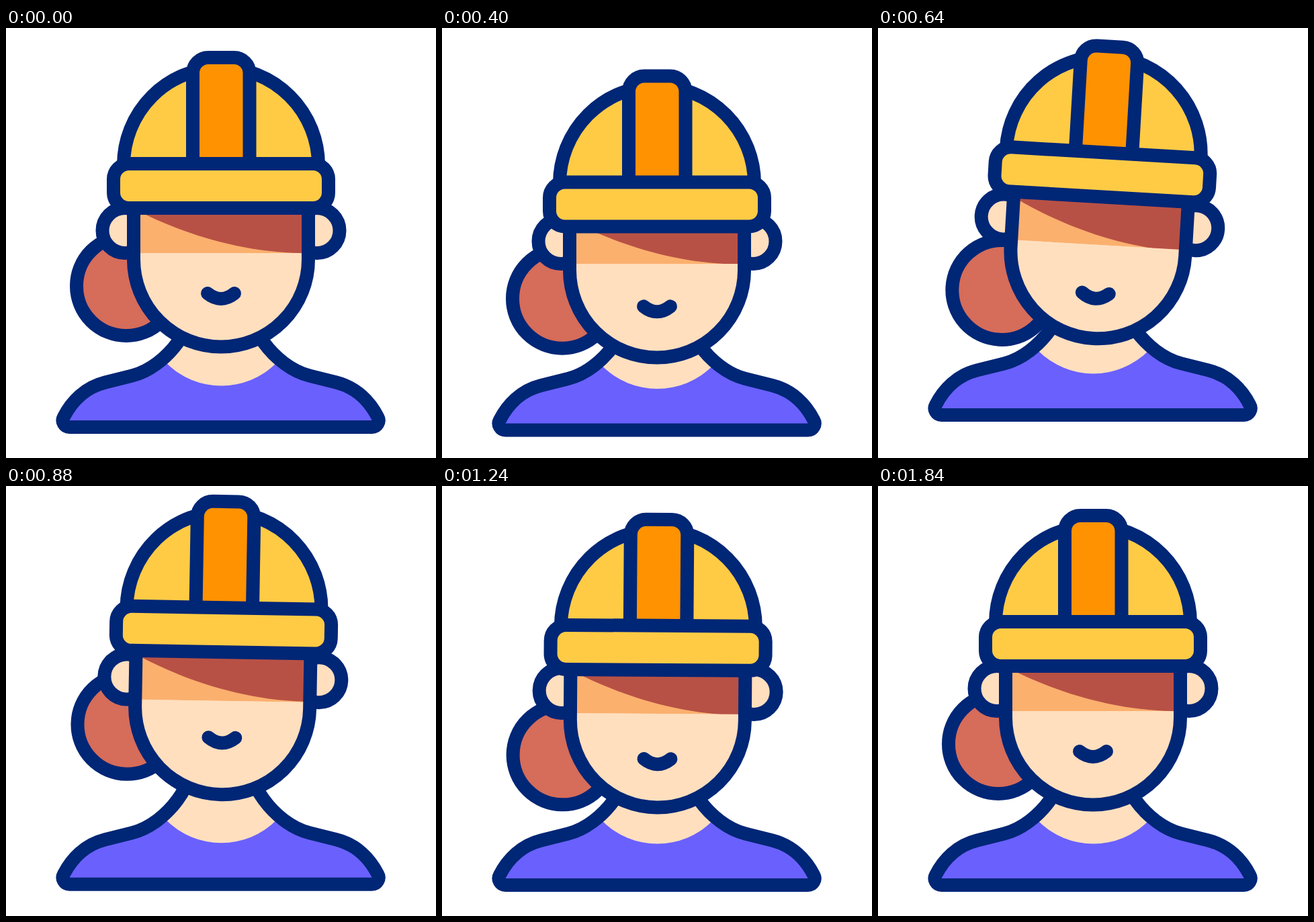
Animation, 640 px wide and 640 px high, one loop 2.56 s. Source, as an HTML page:

```html
<!DOCTYPE html>
<html lang="en">
<head>
<meta charset="utf-8">
<title>Worker with hard hat</title>
<style>
  html, body { margin: 0; width: 100%; height: 100%; overflow: hidden; background: #fff; }
  svg { display: block; width: 100%; height: 100%; }
  .line { stroke: #002676; stroke-width: 20; stroke-linecap: round; stroke-linejoin: round; }
  .skin { fill: #ffdfbe; }
  .yellow { fill: #ffcb45; }
</style>
</head>
<body>
<svg viewBox="0 0 640 640">
  <defs>
    <path id="torso" transform="translate(-.4 0)" d="M274 430C270 446 264 457 256 468
      C240 490 215 511 188 517.5L148 527.5C118 535 98 556 86.3 579A10 10 0 0 0 95 594
      H545A10 10 0 0 0 553.7 579C542 556 522 535 492 527.5L452 517.5
      C425 511 400 490 384 468C376 457 370 446 366 430"/>
    <path id="face" d="M190 240V344.5A130 130 0 0 0 450 344.5V240"/>
    <clipPath id="inTorso"><use href="#torso"/></clipPath>
    <clipPath id="inShade"><rect x="195" y="240" width="250" height="95"/></clipPath>
  </defs>

  <g id="bun">
    <circle class="line" cx="179" cy="384" r="74" fill="#d66c5a"/>
  </g>

  <g id="body">
    <use href="#torso" fill="#6a60fe"/>
    <circle class="skin" cx="320.5" cy="416.5" r="116" clip-path="url(#inTorso)"/>
    <use href="#torso" class="line" fill="none"/>
  </g>

  <g id="head">
    <circle class="skin line" cx="177" cy="301.5" r="33.5"/>
    <circle class="skin line" cx="463" cy="301.5" r="33.5"/>
    <use href="#face" class="skin"/>
    <g clip-path="url(#inShade)">
      <rect x="190" y="240" width="260" height="95" fill="#fbb06e"/>
      <path id="hair" d="M190 230V269C255 303 345 334 440 335H450V230Z" fill="#b85145"/>
    </g>
    <use href="#face" class="line" fill="none"/>
    <path id="mouth" class="line" fill="none" d="M300 395Q320 411 340 395"/>
  </g>

  <g id="helmet">
    <path class="yellow line" d="M175 204A145 145 0 0 1 465 204"/>
    <path class="line" fill="#ff9200" d="M278 202V67A23 23 0 0 1 301 44H339.5A23 23 0 0 1 362.5 67V202"/>
    <rect class="yellow line" x="160" y="202" width="320" height="66" rx="23"/>
  </g>
</svg>
<script>
  const LOOP = 2560, STEP = 40;

  const ease = p => p * p * (3 - 2 * p);

  // A swing leaves rest at `start`, reaches one peak per beat and comes back to rest.
  const swing = (start, beat, ...peaks) => t => {
    const beats = Math.max(0, (t - start) / beat);
    const k = Math.floor(beats);
    const from = peaks[k - 1] || 0, to = peaks[k] || 0;
    return from + (to - from) * ease(beats - k);
  };

  // The jump starts in the body and reaches the looser parts later.
  const bodyY = swing(0, 310, 10.3, -18.3);
  const headY = swing(120, 320, 16.7, -26, 8);
  const bunY = swing(200, 330, 28.5, -27.3, 19, -8.5);
  const mouthY = swing(300, 300, 13, -5.5, 7.5);
  const tiltBy = swing(400, 310, 3.85, -1.2, 0.8);

  // The helmet overshoots the head and sinks deeper as the head drops.
  const helmetY = y => 1.37 * y + 0.022 * Math.max(0, y) ** 2;

  const move = (id, y, tilt = 0) => document.getElementById(id)
    .setAttribute("transform", `translate(0 ${y}) rotate(${tilt} 320 472)`);

  // Poses advance at 25 per second.
  function draw() {
    const t = Math.floor(performance.now() % LOOP / STEP) * STEP;
    const head = headY(t), mouth = mouthY(t), tilt = tiltBy(t);
    move("body", bodyY(t));
    move("bun", bunY(t), tilt);
    move("head", head, tilt);
    move("helmet", helmetY(head), tilt);
    move("mouth", mouth);
    move("hair", mouth * 0.2);
    requestAnimationFrame(draw);
  }
  draw();
</script>
</body>
</html>
```
